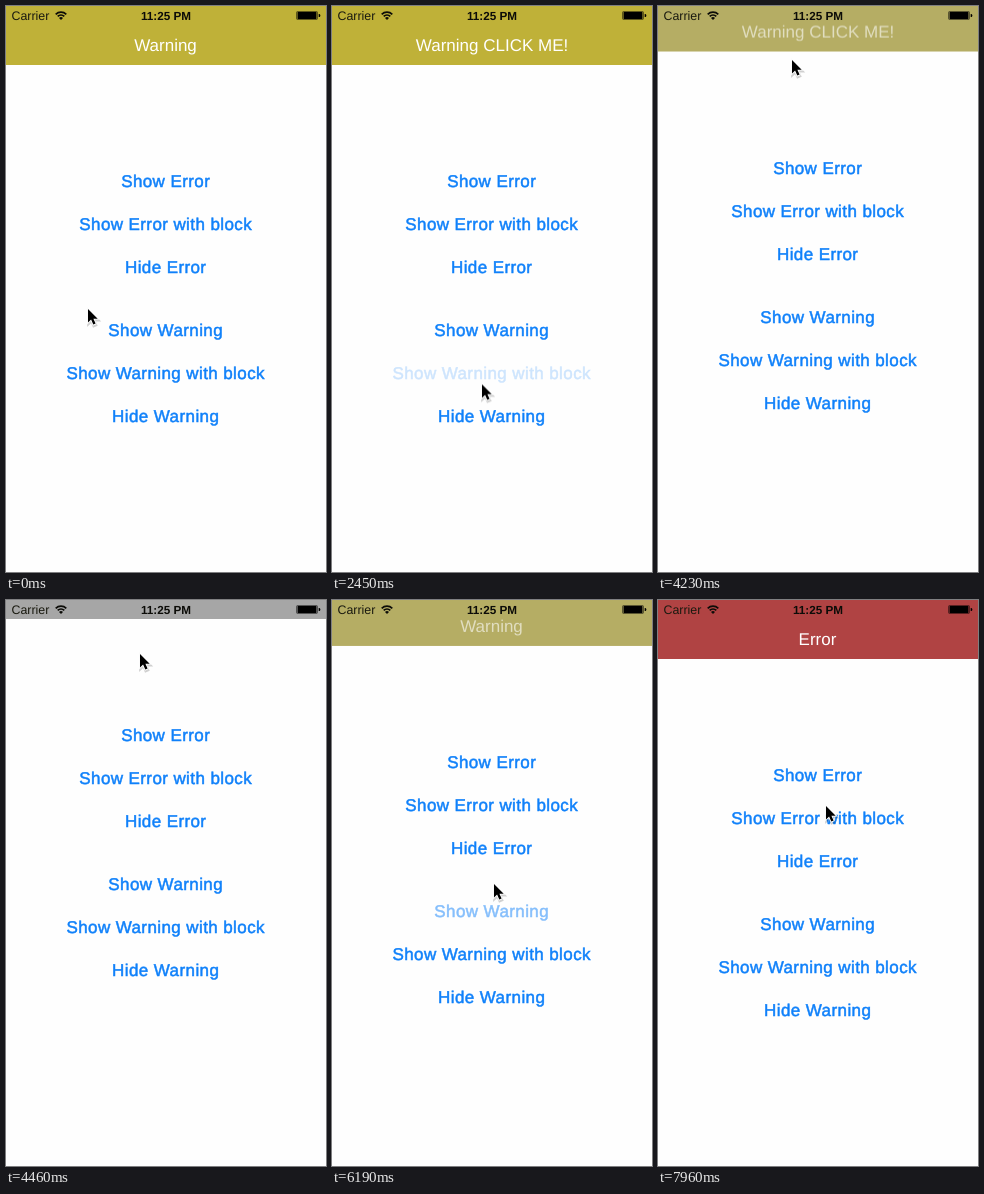
An HTML page that plays this animation: 320x566 px, repeating every 8000 ms.

```html
<!DOCTYPE html>
<html lang="en">
<head>
<meta charset="utf-8">
<title>Message bar</title>
<style>
  html, body { margin: 0; width: 100%; height: 100%; overflow: hidden; background: #fefefe; }
  svg { display: block; width: 320px; height: 566px; }
  text { font-family: "Liberation Sans", Arial, sans-serif; text-rendering: geometricPrecision; }

  .titles { font-size: 17px; fill: #fff; text-anchor: middle; }
  .buttons {
    font-size: 17px; letter-spacing: .4px; text-anchor: middle;
    fill: #0f80fa; stroke: #0f80fa; stroke-width: .5px;
  }

  .sheet { animation: slide 8s linear infinite; }
  .bar { animation: tint 8s linear infinite; }
  .titles { animation: titles 8s linear infinite; }
  .warn { animation: warn 8s step-end infinite; }
  .click { animation: click 8s step-end infinite; }
  .err { animation: err 8s step-end infinite; }
  .show-err { animation: press-err 8s linear infinite; }
  .show-warn { animation: press-warn 8s linear infinite; }
  .block { animation: press-block 8s linear infinite; }
  .cursor { animation: move 8s linear infinite; }

  @keyframes slide {
    0%, 78.875%, 100% { transform: none; }
    51.375% { transform: none; animation-timing-function: ease-in-out; }
    55.125% { transform: translateY(-40px); }
    75.125% { transform: translateY(-40px); animation-timing-function: ease-in-out; }
  }
  @keyframes tint {
    0%, 51.375%, 78.875%, 90.625% { fill: #bfb138; }
    55.125%, 75.125% { fill: #a6a6a6; }
    94.375%, 100% { fill: #b04343; }
  }
  @keyframes titles {
    0%, 51.375%, 78.875%, 100% { opacity: 1; }
    55.125%, 75.125% { opacity: 0; }
  }
  @keyframes warn {
    0%, 75.125% { opacity: 1; }
    30.625%, 90.625%, 100% { opacity: 0; }
  }
  @keyframes click {
    0%, 60%, 100% { opacity: 0; }
    30.625% { opacity: 1; }
  }
  @keyframes err {
    0% { opacity: 0; }
    90.625%, 100% { opacity: 1; }
  }

  /* Instant dim on touch, slow fade back on release */
  @keyframes press-block {
    0%, 29.11%, 36.5%, 100% { opacity: 1; }
    29.12%, 30.625% { opacity: .2; }
  }
  @keyframes press-warn {
    0%, 73.61%, 81%, 100% { opacity: 1; }
    73.62%, 75.125% { opacity: .2; }
  }
  @keyframes press-err {
    0%, 89.11%, 96.5%, 100% { opacity: 1; }
    89.12%, 90.625% { opacity: .2; }
  }

  @keyframes move {
    0%, 1.4% { transform: translate(82px, 303px); }
    3.75%, 5.2% { transform: translate(84px, 305px); }
    5.875% { transform: translate(86px, 307px); }
    8.125% { transform: translate(95px, 325px); }
    10% { transform: translate(110px, 355px); }
    11.875% { transform: translate(119px, 373px); }
    12.625% { transform: translate(121px, 375px); }
    14.875%, 17.2% { transform: translate(121px, 366px); }
    17.875% { transform: translate(121px, 362px); }
    18.75% { transform: translate(128px, 335px); }
    20% { transform: translate(145px, 270px); }
    20.875%, 22.4% { transform: translate(153px, 243px); }
    23.125% { transform: translate(153px, 248px); }
    24.375% { transform: translate(153px, 290px); }
    26.25% { transform: translate(150px, 360px); }
    27.75% { transform: translate(150px, 378px); }
    36.6% { transform: translate(150px, 379px); }
    40% { transform: translate(151px, 378px); }
    41.25% { transform: translate(153px, 360px); }
    42.5% { transform: translate(155px, 320px); }
    43.25% { transform: translate(151px, 203px); }
    44% { transform: translate(143px, 100px); }
    44.75% { transform: translate(132px, 35px); }
    45.5% { transform: translate(124px, 8px); }
    46.5% { transform: translate(119px, 12px); }
    47.875% { transform: translate(128px, 40px); }
    49.125%, 56% { transform: translate(134px, 54px); }
    57% { transform: translate(110px, 95px); }
    58% { transform: translate(75px, 165px); }
    58.75%, 61% { transform: translate(64px, 198px); }
    61.75% { transform: translate(70px, 203px); }
    63.75% { transform: translate(115px, 245px); }
    65.625% { transform: translate(178px, 285px); }
    66.5% { transform: translate(193px, 288px); }
    67.875% { transform: translate(175px, 287px); }
    69.125%, 78.25% { transform: translate(162px, 284px); }
    80% { transform: translate(165px, 240px); }
    81.75%, 83.875% { transform: translate(168px, 183px); }
    84.625% { transform: translate(168px, 179px); }
    85.375%, 95.625% { transform: translate(168px, 175px); }
    97.25% { transform: translate(168px, 188px); }
    98.75%, 99.4% { transform: translate(168px, 202px); }
    99.5%, 100% { transform: translate(168px, 206px); }
  }
</style>
</head>
<body>
<svg viewBox="0 0 320 566">
  <rect width="320" height="566" fill="#fefefe"/>

  <g class="sheet">
    <rect class="bar" width="320" height="59"/>
    <g class="titles">
      <text class="warn" x="159.5" y="45">Warning</text>
      <text class="click" x="160" y="45">Warning CLICK ME!</text>
      <text class="err" x="159.5" y="45">Error</text>
    </g>
    <g class="buttons">
      <text class="show-err" x="159.7" y="181">Show Error</text>
      <text x="159.7" y="224">Show Error with block</text>
      <text x="159.7" y="267">Hide Error</text>
      <text class="show-warn" x="159.7" y="330">Show Warning</text>
      <text class="block" x="159.7" y="373">Show Warning with block</text>
      <text x="159.7" y="416">Hide Warning</text>
    </g>
  </g>

  <g class="status">
    <text x="5.5" y="13.7" font-size="12.4" fill="#1a1a10">Carrier</text>
    <path d="M49.7 8.3a7.5 7.5 0 0 1 10.6 0M51.7 10.4a4.7 4.7 0 0 1 6.6 0" fill="none" stroke="#0c0c08" stroke-width="1.7"/>
    <path d="M55 14l-2-2.1a2.9 2.9 0 0 1 4 0z" fill="#0c0c08"/>
    <text x="160" y="13.7" font-size="11.7" font-weight="bold" text-anchor="middle" fill="#0c0c08">11:25 PM</text>
    <rect x="290.5" y="5.5" width="21" height="8" rx="1" fill="none" stroke="#000" stroke-opacity=".5"/>
    <rect x="291.5" y="6" width="19" height="7" rx=".5"/>
    <path d="M312.7 8h.6a1 1.5 0 0 1 0 3h-.6z"/>
  </g>

  <g class="cursor">
    <path d="M0 0V13.5L3.1 10.6 5.3 15.6 7.6 14.6 5.4 9.7H9.7Z" transform="translate(.4 1.4)" stroke="#000" stroke-width="2.6" opacity=".18"/>
    <path d="M0 0V13.5L3.1 10.6 5.3 15.6 7.6 14.6 5.4 9.7H9.7Z" stroke="#fff" stroke-width="1.8" paint-order="stroke"/>
  </g>
</svg>
</body>
</html>
```
